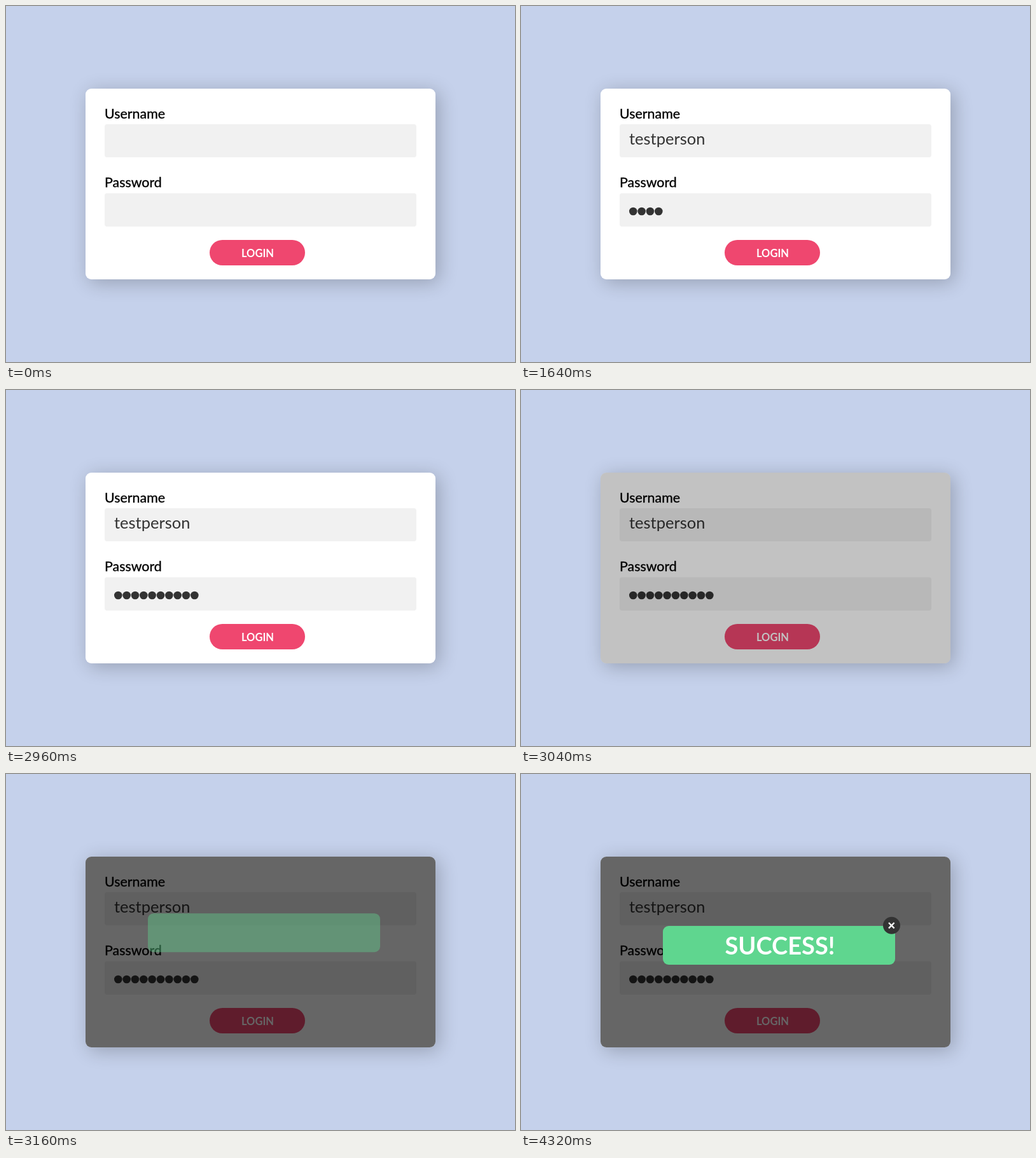
Recreate the animation shown at these times as an HTML page. Size 800 by 560 pixels, loop 4.76 s.

```html
<!DOCTYPE html>
<html lang="en">
<head>
<meta charset="utf-8">
<title>Login form</title>
<style>
  html, body { margin: 0; width: 100%; height: 100%; overflow: hidden; background: #c5d1eb; }
  .card {
    position: absolute; left: 125px; top: 130px; width: 550px; height: 300px;
    border-radius: 9px; background: #fff; box-shadow: 5px 5px 30px rgba(0, 0, 0, .24);
  }
  svg { position: absolute; left: 0; top: 0; font-family: Lato, "Open Sans", sans-serif; }
  .label { font-size: 21.4px; stroke: #000; stroke-width: .35px; }
  .field { fill: #f1f1f1; }
  .bold { font-weight: 700; fill: #fff; text-anchor: middle; }
</style>
</head>
<body>
<div class="card"></div>
<svg width="800" height="560" viewBox="0 0 800 560">
  <text class="label" x="155" y="177">Username</text>
  <rect class="field" x="155" y="186" width="490" height="52" rx="4"/>
  <text id="user" x="170" y="218" font-size="25.5" fill="#333"></text>
  <text class="label" x="155" y="285">Password</text>
  <rect class="field" x="155" y="294.5" width="490" height="52.5" rx="4"/>
  <g id="dots" fill="#333"></g>
  <g id="button">
    <rect x="320" y="368" width="150" height="40" rx="20" fill="#ef476f"/>
    <text class="bold" x="395.5" y="394.5" font-size="16.5">LOGIN</text>
  </g>
  <rect id="shade" x="125" y="130" width="550" height="300" rx="9"/>
  <rect id="popup" x="223" y="239" width="365" height="61" rx="9" fill="#5fd68f"/>
  <g id="message">
    <text class="bold" x="407" y="284" font-size="38">SUCCESS!</text>
    <circle cx="582.5" cy="238.3" r="13.5" fill="#333"/>
    <path d="M578 234l8.6 8.6m0-8.6l-8.6 8.6" stroke="#fff" stroke-width="2.4"/>
  </g>
</svg>
<script>
const LOOP = 4760, STEP = 40, NAME = 'testperson';
const $ = id => document.getElementById(id);
const [user, dots, button, shade, popup, message] =
  ['user', 'dots', 'button', 'shade', 'popup', 'message'].map($);

for (let i = 0; i < 10; i++) {
  const dot = document.createElementNS('http://www.w3.org/2000/svg', 'circle');
  dot.setAttribute('cx', 176.3 + 13.34 * i);
  dot.setAttribute('cy', 323);
  dot.setAttribute('r', 6.3);
  dots.append(dot);
}

const progress = (t, from, to) => Math.min(1, Math.max(0, (t - from) / (to - from)));
const typed = (t, start, pace) => Math.max(0, Math.floor((t - start) / pace) + 1);

function draw(t) {
  user.textContent = NAME.slice(0, typed(t, 15, 104));

  const count = typed(t, 1290, 111.1);
  [...dots.children].forEach((dot, i) => dot.setAttribute('visibility', i < count ? 'visible' : 'hidden'));

  const press = 1 - .05 * Math.sin(Math.PI * progress(t, 2600, 2960));
  button.setAttribute('transform', `translate(395 388) scale(${press}) translate(-395 -388)`);

  shade.setAttribute('opacity', .6 * progress(t, 2960, 3160));

  const drop = progress(t, 3080, 3280);
  popup.setAttribute('opacity', drop);
  popup.setAttribute('transform', `translate(0 ${33 * (drop - 1)})`);
  message.setAttribute('opacity', progress(t, 3240, 3420));
}

const begin = performance.now();
function tick() {
  const t = Math.max(0, performance.now() - begin) % LOOP;
  draw(Math.floor(t / STEP) * STEP);
  requestAnimationFrame(tick);
}
draw(0);
requestAnimationFrame(tick);
</script>
</body>
</html>
```
